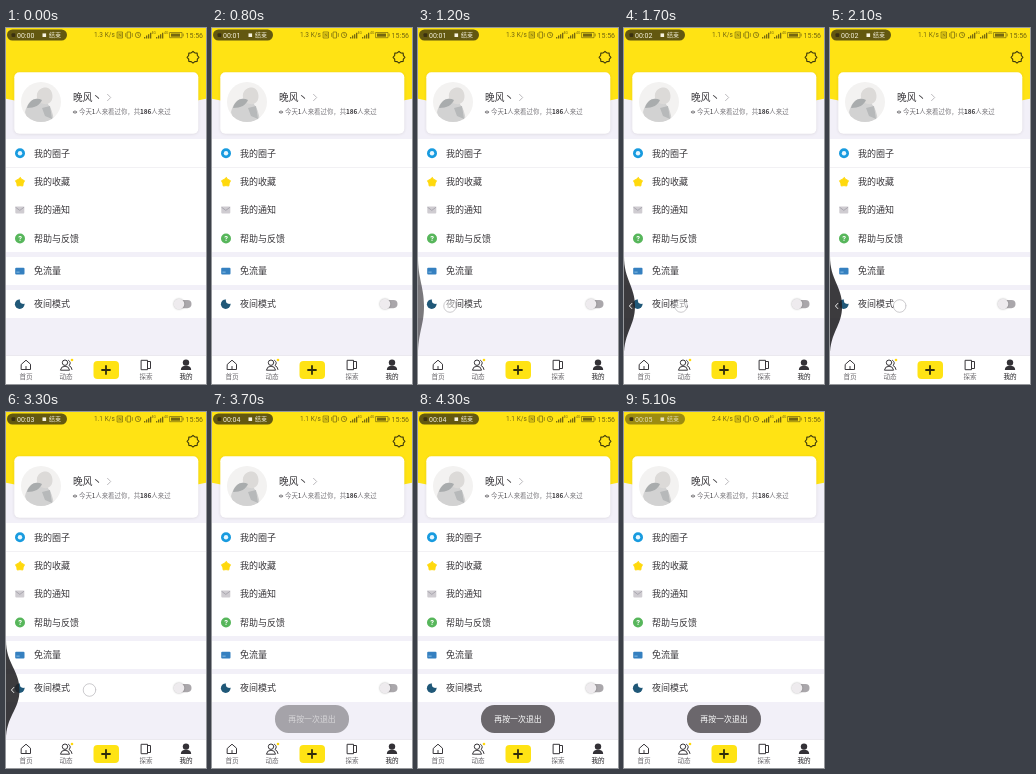
Write an HTML page with a canvas that moves like this. It is 200 by 356 pixels and loops after 5.2 s.

```html
<!DOCTYPE html>
<html lang="zh-CN">
<head>
<meta charset="utf-8">
<title>我的</title>
<style>
html, body { margin: 0; width: 100%; height: 100%; overflow: hidden; background: #f2f0f8; }
canvas { display: block; width: 200px; height: 356px; }
</style>
</head>
<body>
<canvas id="stage"></canvas>
<script>
const W = 200, H = 356, LOOP = 5200;
const FONT = '"Noto Sans CJK SC", "Noto Sans CJK", "Noto Sans", sans-serif';
const LATIN = 'Roboto, "Noto Sans", sans-serif';
const INK = '#38363a', YELLOW = '#ffe314', PAGE = '#f2f0f8';
const canvas = document.getElementById('stage');
const ctx = canvas.getContext('2d');
const dpr = window.devicePixelRatio || 1;
canvas.width = W * dpr;
canvas.height = H * dpr;

const clamp = v => Math.max(0, Math.min(1, v));
const ramp = (t, a, b) => clamp((t - a) / (b - a));
const smooth = v => v * v * (3 - 2 * v);

// Interpolates through [time, value] pairs.
function track(t, keys) {
  if (t <= keys[0][0]) return keys[0][1];
  for (let i = 1; i < keys.length; i++) {
    const [a, u] = keys[i - 1], [b, v] = keys[i];
    if (t <= b) return u + (v - u) * ramp(t, a, b);
  }
  return keys[keys.length - 1][1];
}

function rect(x, y, w, h, color, r = 0) {
  ctx.fillStyle = color;
  ctx.beginPath();
  ctx.roundRect(x, y, w, h, r);
  ctx.fill();
}

function disc(x, y, r, color) {
  ctx.fillStyle = color;
  ctx.beginPath();
  ctx.arc(x, y, r, 0, 7);
  ctx.fill();
}

function ring(x, y, r, color, w = 1) {
  ctx.strokeStyle = color;
  ctx.lineWidth = w;
  ctx.beginPath();
  ctx.arc(x, y, r, 0, 7);
  ctx.stroke();
}

function text(s, x, y, size, color = INK, { align = 'left', weight = 400, font = FONT } = {}) {
  ctx.font = `${weight} ${size}px ${font}`;
  ctx.fillStyle = color;
  ctx.textAlign = align;
  ctx.textBaseline = 'alphabetic';
  ctx.fillText(s, x, y + size * 0.37);
  return x + ctx.measureText(s).width;
}

function path(d, color, w = 0) {
  const p = new Path2D(d);
  if (w) {
    ctx.strokeStyle = color;
    ctx.lineWidth = w;
    ctx.lineCap = ctx.lineJoin = 'round';
    ctx.stroke(p);
  } else {
    ctx.fillStyle = color;
    ctx.fill(p);
  }
}

function radial(x, y, n, radius) {
  ctx.beginPath();
  for (let i = 0; i < n; i++) {
    const a = i / n * Math.PI * 2 - Math.PI / 2, r = radius(i);
    ctx.lineTo(x + r * Math.cos(a), y + r * Math.sin(a));
  }
  ctx.closePath();
}

function gear(x, y) {
  radial(x, y, 16, i => i % 2 ? 4.7 : 5.9);
  ctx.strokeStyle = '#3c380c';
  ctx.lineWidth = 1.1;
  ctx.lineJoin = 'round';
  ctx.stroke();
}

function statusBar(t) {
  const tone = '#75680f';
  const speed = t < 1400 ? '1.3' : t < 4600 ? '1.1' : '2.4';
  text(speed + ' K/s', 88, 7, 6.5, tone, { font: LATIN });
  path('M111.5 4h5v6h-5z M113 8.5v-3l2 3v-3', tone, 0.7);
  path('M121.5 4h3v6h-3z M119.7 5.5v3 M126.3 5.5v3', tone, 0.7);
  ring(132, 7, 2.7, tone, 0.7);
  path('M132 5.5v1.7l1.2 .6', tone, 0.6);
  for (const x of [138, 150])
    for (let i = 0; i < 4; i++) rect(x + i * 2, 9 - i * 1.4, 1.3, 1.5 + i * 1.4, tone);
  text('4G', 145.5, 5, 3.5, tone, { font: LATIN });
  text('4G', 158, 5, 3.5, tone, { font: LATIN });
  path('M164 4.5h12v5.2h-12z M177.2 6v2', tone, 0.7);
  rect(165, 5.5, 9, 3.2, tone);
  text('15:56', 197, 7, 7, tone, { align: 'right', font: LATIN });

  const fade = ramp(t, 4900, 5100);
  const sec = Math.floor((t + 300) / 1000);
  const label = `rgba(255,252,235,${0.95 - 0.2 * fade})`;
  rect(1, 1.5, 60, 11, `rgba(40,35,15,${0.72 - 0.26 * fade})`, 5.5);
  rect(5.5, 5.2, 3.8, 3.8, '#3a3010', 1);
  text('00:0' + sec, 11, 7.2, 7, label, { font: LATIN });
  rect(36.5, 5.4, 3.6, 3.6, label);
  text('结束', 43, 7, 6, label);
}

function avatar() {
  ctx.save();
  ctx.beginPath();
  ctx.arc(35, 74, 20, 0, 7);
  ctx.clip();
  rect(15, 54, 40, 40, '#f3f2f1');
  path('M19 84C22 72 30 68 37 72S47 83 48 95H22z', '#d2d2d2');
  path('M31 66C33 58 44 57 46 65C48 72 44 77 38 76C33 75 30 71 31 66z', '#dcdad8');
  path('M21 80C23 72 30 69 36 72C34 77 29 80 21 80z', '#a9acad');
  path('M36 80L44 78L46 91L39 88z', '#b7b9ba');
  ctx.restore();
}

function profile() {
  ctx.save();
  ctx.shadowColor = 'rgba(70,60,50,.12)';
  ctx.shadowBlur = 3 * dpr;
  ctx.shadowOffsetY = 0.5 * dpr;
  rect(8.3, 44.2, 184, 61.6, '#fff', 5);
  ctx.restore();
  avatar();
  text('晚风丶', 67, 69.8, 9.7);
  path('M101.5 66.3l3.2 3.2l-3.2 3.2', '#aaa8ac', 0.8);
  path('M66.7 84Q69 80.8 71.3 84Q69 87.2 66.7 84z', '#68666a');
  disc(69, 84, 0.8, '#fff');
  let x = text('今天', 73, 83.8, 6.4, '#77757a');
  x = text('1', x, 83.8, 6.4, INK, { weight: 500 });
  x = text('人来看过你，共', x, 83.8, 6.4, '#77757a');
  x = text('186', x, 83.8, 6.4, INK, { weight: 700 });
  text('人来过', x, 83.8, 6.4, '#77757a');
}

function menu() {
  rect(0, 111, W, 113, '#fff');
  rect(0, 139, W, 1, '#f2f1f4');
  rect(0, 229, W, 28, '#fff');
  rect(0, 262, W, 28, '#fff');
  const rows = { 我的圈子: 125.5, 我的收藏: 154, 我的通知: 182, 帮助与反馈: 210.5, 免流量: 243, 夜间模式: 276 };
  for (const name in rows) text(name, 28, rows[name], 9);

  disc(14, 125.3, 5, '#189bdf');
  disc(14, 125.3, 2.2, '#e8f7ff');

  radial(14, 154.2, 10, i => i % 2 ? 3.4 : 4.7);
  ctx.fillStyle = ctx.strokeStyle = '#ffd90d';
  ctx.lineWidth = 1;
  ctx.lineJoin = 'round';
  ctx.fill();
  ctx.stroke();

  rect(9.3, 178.6, 9, 6.9, '#cfccd1', 1);
  path('M9.8 179.4l4 3l4 -3', '#a09da6', 0.8);

  disc(14, 210.5, 5, '#57b65b');
  text('?', 14, 210.5, 7.5, '#fff', { align: 'center', weight: 700, font: LATIN });

  rect(9.2, 239.8, 9.3, 6.8, '#3580c0', 1);
  rect(10.4, 243.7, 3.2, 0.8, '#9bcaeb');

  disc(13.7, 276.2, 4.8, '#205878');
  disc(17.2, 272.6, 3.3, '#fff');

  rect(169, 272, 16.5, 8.2, '#aaa7ab', 4.1);
  ctx.save();
  ctx.shadowColor = 'rgba(0,0,0,.3)';
  ctx.shadowBlur = 2 * dpr;
  disc(173, 276, 5.3, '#eeebee');
  ctx.restore();
}

function tabs() {
  rect(0, 328, W, 28, '#fff');
  rect(0, 327.5, W, 0.6, '#e5e3e8');
  path('M15.5 336.2l4.5-4l4.5 4v5.3h-9z M20 338.5v3', INK, 1);
  ring(59, 334.7, 2.7, INK);
  path('M54.5 341.8Q55 338.2 59 338.2T63.5 341.8z M62.5 332.3Q65.8 334.5 63 337.5Q65.7 338.7 66 341.5', INK, 1);
  disc(66, 332, 1.3, '#ffd80c');
  rect(87.5, 333, 25.5, 18, YELLOW, 4);
  path('M100 338v8 M96 342h8', '#302c0c', 1.8);
  path('M135.5 332.3h6v9.4h-6z M141.5 333.5h3v7h-3', INK, 1);
  disc(180, 334.6, 3.2, '#333136');
  path('M174.8 342Q175 337.8 180 337.8T185.2 342z', '#333136');
  const names = ['首页', '动态', '', '探索', '我的'];
  names.forEach((s, i) => text(s, 20 + i * 40, 348.8, 6.6, i === 4 ? '#222024' : '#68666a', { align: 'center' }));
}

function touch(x, y, a) {
  ctx.save();
  ctx.globalAlpha = a;
  disc(x, y, 6.3, 'rgba(255,255,255,.5)');
  ring(x, y, 6.3, 'rgba(130,127,135,.5)', 0.8);
  ctx.restore();
}

function backSwipe(t) {
  if (t < 800 || t > 3600) return;
  const y = 278;
  const x = track(t, [[800, 3], [1200, 32], [1700, 57], [2300, 76], [2600, 80], [3400, 84]]);
  const out = smooth(ramp(t, 3350, 3580));
  const w = track(t, [[850, 0], [1200, 6], [1700, 11], [2600, 13.5]]) * (1 - out);
  const dark = track(t, [[800, 0.35], [1200, 0.6], [1700, 0.88]]) * (1 - out);
  path(`M0 ${y - 50}C0 ${y - 26} ${w} ${y - 20} ${w} ${y}C${w} ${y + 20} 0 ${y + 26} 0 ${y + 50}z`, `rgba(34,32,36,${dark})`);
  const arrow = ramp(t, 1350, 1650) * (1 - out);
  if (arrow > 0) path(`M7.8 ${y - 2.6}l-2.4 2.6l2.4 2.6`, `rgba(255,255,255,${arrow})`, 0.9);
  touch(x, y, ramp(t, 800, 900) * (1 - ramp(t, 3350, 3450)));
}

function toast(t) {
  const a = ramp(t, 3420, 3920);
  if (!a) return;
  ctx.save();
  ctx.globalAlpha = a;
  rect(63, 293, 74, 28, 'rgba(92,89,94,.9)', 13.5);
  text('再按一次退出', 100, 307.2, 7.9, '#fff', { align: 'center' });
  ctx.restore();
}

function draw(now) {
  const t = now % LOOP;
  ctx.setTransform(dpr, 0, 0, dpr, 0, 0);
  rect(0, 0, W, H, PAGE);
  path('M0 0H200V70.8Q100 94 0 70.8z', YELLOW);
  gear(187, 29.3);
  statusBar(t);
  profile();
  menu();
  tabs();
  backSwipe(t);
  toast(t);
}

const start = performance.now();
function loop() {
  draw(performance.now() - start);
  requestAnimationFrame(loop);
}
loop();
</script>
</body>
</html>
```
